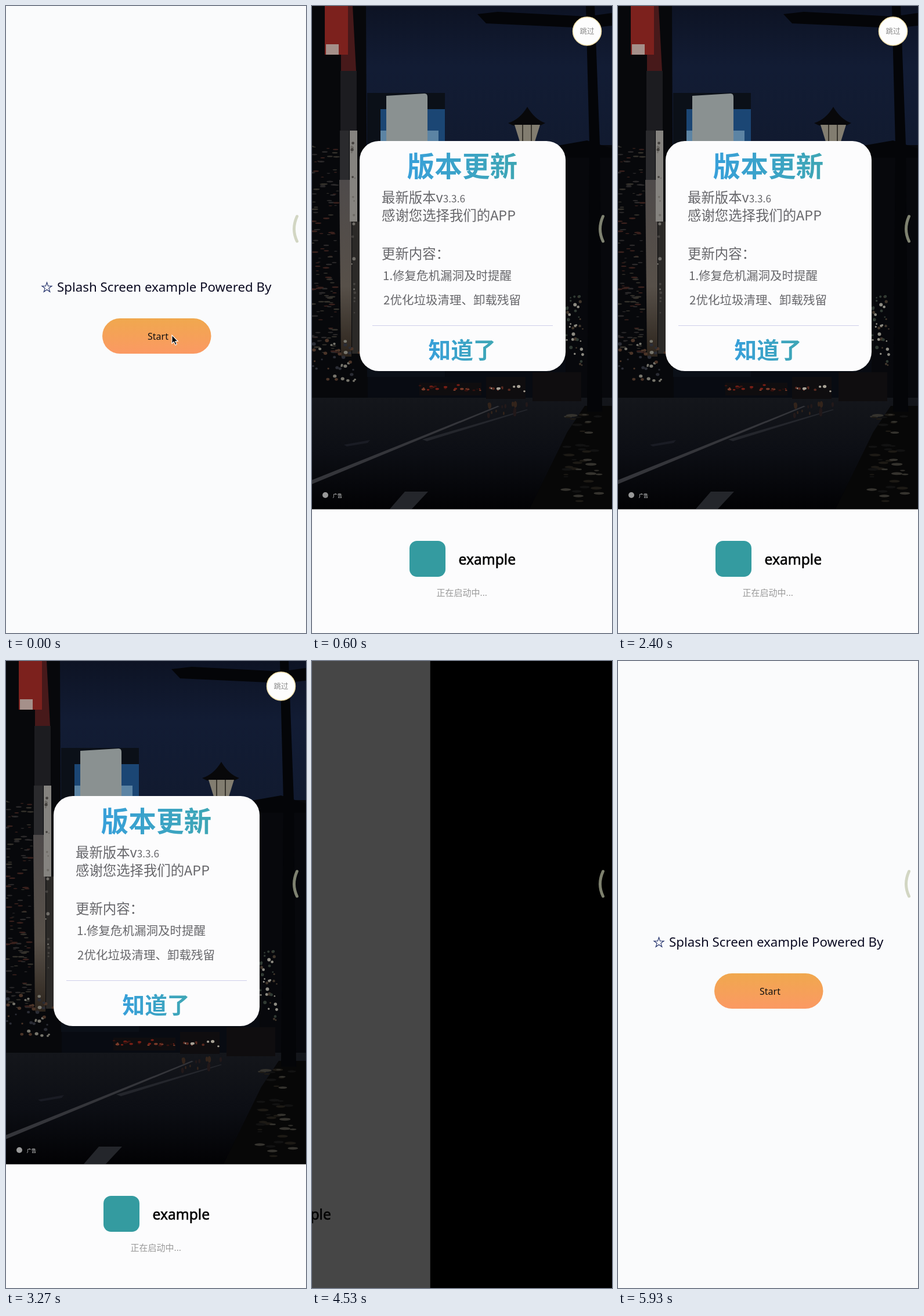
An HTML page for the animation above (5.99 s loop, 517 by 1082 pixels).

```html
<!DOCTYPE html>
<html lang="zh">
<head>
<meta charset="utf-8">
<title>Splash screen demo</title>
<style>
html, body { margin: 0; width: 100%; height: 100%; overflow: hidden; background: #000; }
svg { display: block; width: 517px; height: 1082px; }
text { font-family: "Noto Sans", "Noto Sans CJK SC", "Noto Sans CJK", sans-serif; }
.cjk { font-family: "Noto Sans CJK SC", "Noto Sans CJK", "Noto Sans", sans-serif; fill: #66666a; }
.mid { text-anchor: middle; }
</style>
</head>
<body>
<svg viewBox="0 0 517 1082">
  <defs>
    <linearGradient id="btn" x2="0" y2="1"><stop stop-color="#f0a84e"/><stop offset="1" stop-color="#fb9963"/></linearGradient>
    <linearGradient id="teal"><stop stop-color="#38a0da"/><stop offset="1" stop-color="#3ea6b4"/></linearGradient>
    <linearGradient id="sky" x2="0" y2="1"><stop stop-color="#0d1324"/><stop offset=".12" stop-color="#121c34"/><stop offset=".3" stop-color="#111a2f"/><stop offset=".5" stop-color="#080b12"/></linearGradient>
    <linearGradient id="road" x2="0" y2="1"><stop stop-color="#14161b"/><stop offset=".5" stop-color="#0c0e14"/><stop offset="1" stop-color="#020204"/></linearGradient>
    <linearGradient id="strip" x2="0" y2="1"><stop stop-color="#4e4a4a"/><stop offset=".6" stop-color="#575049"/><stop offset="1" stop-color="#2c241c"/></linearGradient>
    <clipPath id="photo"><path d="M0 0H517V868.500H0z"/></clipPath>
  </defs>

  <g id="page">
    <path d="M0 0H530V1082H0z" fill="#fafbfc"/>
    <path id="star" fill="none" stroke="#1b2a66" stroke-width="1.1"/>
    <text x="88" y="492.500" font-size="22.300" fill="#0b0b22">Splash Screen example Powered By</text>
    <rect x="166" y="539" width="187.500" height="61" rx="30.500" fill="url(#btn)"/>
    <text class="mid" x="262" y="575.500" font-size="16" fill="#111">Start</text>
    <g id="splash">
      <path d="M0 0H530V1082H0z" fill="#fbfbfd"/>
      <g id="brand">
        <rect x="168" y="923" width="62" height="62" rx="13" fill="#349ba0"/>
        <text x="252.500" y="963.500" font-size="24.600" stroke="#000" stroke-width=".6">example</text>
        <text class="cjk" x="214.500" y="1017.500" font-size="15" style="fill:#999">正在启动中...</text>
      </g>
    </g>
    <path id="dim" d="M0 0H530V1082H0z"/>
  </g>

  <g id="ad">
    <path d="M0 0H530V1082H0z"/>
    <g id="content">
      <g clip-path="url(#photo)">
        <path d="M0 0H517V868H0z" fill="url(#sky)"/>
        <path d="M0 0H93L96 690H0z" fill="#07080b"/>
        <path d="M95 150H229V640H95z" fill="#0b1018"/>
        <path d="M22 0H62V84H22z" fill="#7c211d"/>
        <path d="M62 0H70L76 112H50V84H62z" fill="#47191a"/>
        <path d="M24 66H46V84H24z" fill="#a5908a"/>
        <path d="M49 112H77V215H49z" fill="#1c1c20"/>
        <path d="M48 215H64V300H48z" fill="#2a2a2d"/>
        <path d="M47 300H68V605H50z" fill="url(#strip)"/>
        <path d="M65 215H78V372H65z" fill="#85837f"/>
        <path d="M69 372H82V600H69z" fill="#2b2927"/>
        <path d="M118 178H229V233H118z" fill="#1b4674"/>
        <path d="M118 215H128V233H118zM199 215H218V233H199z" fill="#5c84a4"/>
        <path d="M128 155L194 151Q199 151 199 157V233H128z" fill="#8a9191"/>
        <path d="M437 240H517V690H437z" fill="#07080c"/>
        <path d="M0 676H517V868H0z" fill="url(#road)"/>
        <path d="M0 818L320 690 323 691 0 825z" fill="#34353a"/>
        <path d="M190 748L370 696 372 697 198 751z" fill="#24262c"/>
        <path d="M160 838H200L172 868H134z" fill="#24262b"/>
        <path d="M55 757L100 749 96 754 60 760z" fill="#1a1c24"/>
        <path d="M300 640H368V678H300zM185 650H292V672H185zM380 632H464V682H380z" fill="#0f0d0f"/>
        <path d="M440 735L470 690H517V868H375z" fill="#070707"/>
        <g id="lights"></g>
        <path d="M285 14L320 10 474 18 517 12V34L474 38 300 30zM400 245L474 232 517 246V262H400zM472 0H487L496 240 500 700H474L478 240z" fill="#040508"/>
        <path d="M338 202Q358 196 371 174Q384 196 402 202L394 206H346zM362 232H380V245H362z" fill="#08080a"/>
        <path d="M349 205H393L384 234H358z" fill="#827d70"/>
        <path d="M363 205V234M378 205V234" stroke="#37332c" stroke-width="2"/>
        <circle cx="23" cy="844" r="5" fill="#999"/>
        <text class="cjk" x="36" y="847.500" font-size="8" style="fill:#eee">广告</text>
      </g>
      <rect x="82" y="233" width="355" height="397" rx="33" fill="#fcfcfd"/>
      <g font-size="23.400">
        <text class="cjk" x="163.500" y="293.500" font-size="47.700" font-weight="700" style="fill:url(#teal)">版本更新</text>
        <text class="cjk" x="120" y="338.500">最新版本v<tspan font-size="17.200">3.3.6</tspan></text>
        <text class="cjk" x="120" y="370">感谢您选择我们的APP</text>
        <text class="cjk" x="120" y="436">更新内容：</text>
        <text class="cjk" x="122" y="473" font-size="20.500">1.修复危机漏洞及时提醒</text>
        <text class="cjk" x="123" y="515" font-size="20.500">2优化垃圾清理、卸载残留</text>
        <path d="M104 551.500H415" stroke="#cfcfea"/>
        <text class="cjk" x="200.500" y="607.500" font-size="38.700" font-weight="700" style="fill:url(#teal)">知道了</text>
      </g>
      <circle cx="474" cy="43.500" r="24.500" fill="#fdfdfd" stroke="#f1dda6" stroke-width="1.500"/>
      <text class="cjk mid" x="474" y="47.500" font-size="12.500" style="fill:#888">跳过</text>
      <path d="M0 868.500H517V1082H0z" fill="#fcfcfd"/>
      <use href="#brand"/>
    </g>
  </g>

  <path d="M501.500 363Q491.500 385 501.500 406" fill="none" stroke="#bec3a5" stroke-opacity=".66" stroke-width="5" stroke-linecap="round"/>

  <g id="ring">
    <circle cx="474" cy="49.500" r="19.500" fill="#fff" fill-opacity=".3" stroke="#fff" stroke-width="6"/>
    <circle cx="474" cy="49.500" r="19.500" fill="none" stroke="#000" stroke-width="3.200"/>
  </g>
  <path id="cursor" d="M0 0V14.500L3.300 11.400 5.800 17 8.200 16 5.800 10.500H10.300z" stroke="#fff" stroke-width="1.100"/>
</svg>
<script>
const LOOP = 5990, W = 517, SLIDE = 416;
const [page, splash, dim, ad, content, ring, cursor, star, lights] =
  ["page", "splash", "dim", "ad", "content", "ring", "cursor", "star", "lights"]
    .map(id => document.getElementById(id));

const clamp = v => Math.min(1, Math.max(0, v));
const ramp = (t, start, length) => clamp((t - start) / length);
const easeOut = u => 1 - (1 - u) ** 3;
const show = (el, on) => el.setAttribute("visibility", on ? "inherit" : "hidden");
const move = (el, x, y = 0) => el.setAttribute("transform", `translate(${x} ${y})`);

star.setAttribute("d", "M" + Array.from({ length: 10 }, (_, i) => {
  const a = i * Math.PI / 5, r = i % 2 ? 3.5 : 9;
  return `${70.5 + r * Math.sin(a)} ${486 - r * Math.cos(a)}`;
}).join("L") + "z");

// Street lights, windows and reflections scattered over the photo
let seed = 7;
const rnd = () => (seed = seed * 16807 % 2147483647) / 2147483647;
function scatter(n, x, y, w, h, rx, ry, colors) {
  let out = "";
  for (let i = 0; i < n; i++) {
    const s = 0.4 + rnd() * 0.6;
    out += `<ellipse cx="${x + rnd() * w}" cy="${y + rnd() * h}" rx="${s * rx}" ry="${s * ry}" fill="${colors[i % colors.length]}"/>`;
  }
  return out;
}
lights.innerHTML =
  scatter(130, 0, 240, 44, 360, 6, 1.5, ["#2c2a2b", "#3a211d", "#35322c"]) +
  scatter(20, 68, 225, 6, 350, 3, 3, ["#45423f", "#6f6c67"]) +
  scatter(40, 0, 575, 84, 80, 3.5, 3, ["#77756c", "#4a3428", "#2b2d35"]) +
  scatter(40, 437, 500, 30, 120, 3, 3, ["#8d8b82", "#303a33", "#40362c"]) +
  scatter(24, 186, 654, 108, 10, 3.5, 2, ["#7a1f16", "#35120f", "#7c3c2a"]) +
  scatter(12, 302, 656, 66, 10, 3.5, 3, ["#a8a296", "#5a2a20"]) +
  scatter(14, 302, 684, 70, 24, 3, 6, ["#33241b", "#22191a"]) +
  scatter(44, 435, 705, 62, 155, 10, 2.5, ["#1d1a15", "#35332e", "#121212"]);

function cursorAt(t) {
  if (t < 400) {
    const k = Math.max(0, (t - 100) / 170) ** 1.5;
    return [286 + 160 * k, 568 + 91 * k];
  }
  const away = 1 - easeOut(ramp(t, 3700, 330)) + ramp(t, 4230, 200) ** 2;
  return [474 + 60 * away, 48 + 200 * away];
}

function draw(now) {
  const t = now % LOOP;
  const p = easeOut(ramp(t, 200, SLIDE)) - easeOut(ramp(t, 4467, SLIDE));
  move(page, -p * W - Math.min(5, p * 200));
  move(ad, (1 - p) * W);
  dim.setAttribute("opacity", 0.72 * clamp(p / 0.42) ** 1.6);
  splash.setAttribute("opacity", ramp(t, 80, 300) - ramp(t, 4690, 300));
  show(content, t >= 500 && t < 4460);
  show(ring, t >= 4070 && t < 4200);
  show(cursor, t < 400 || t > 3700 && t < 4430);
  move(cursor, ...cursorAt(t));
}

const start = performance.now();
function frame() {
  draw(performance.now() - start);
  requestAnimationFrame(frame);
}
frame();
</script>
</body>
</html>
```
